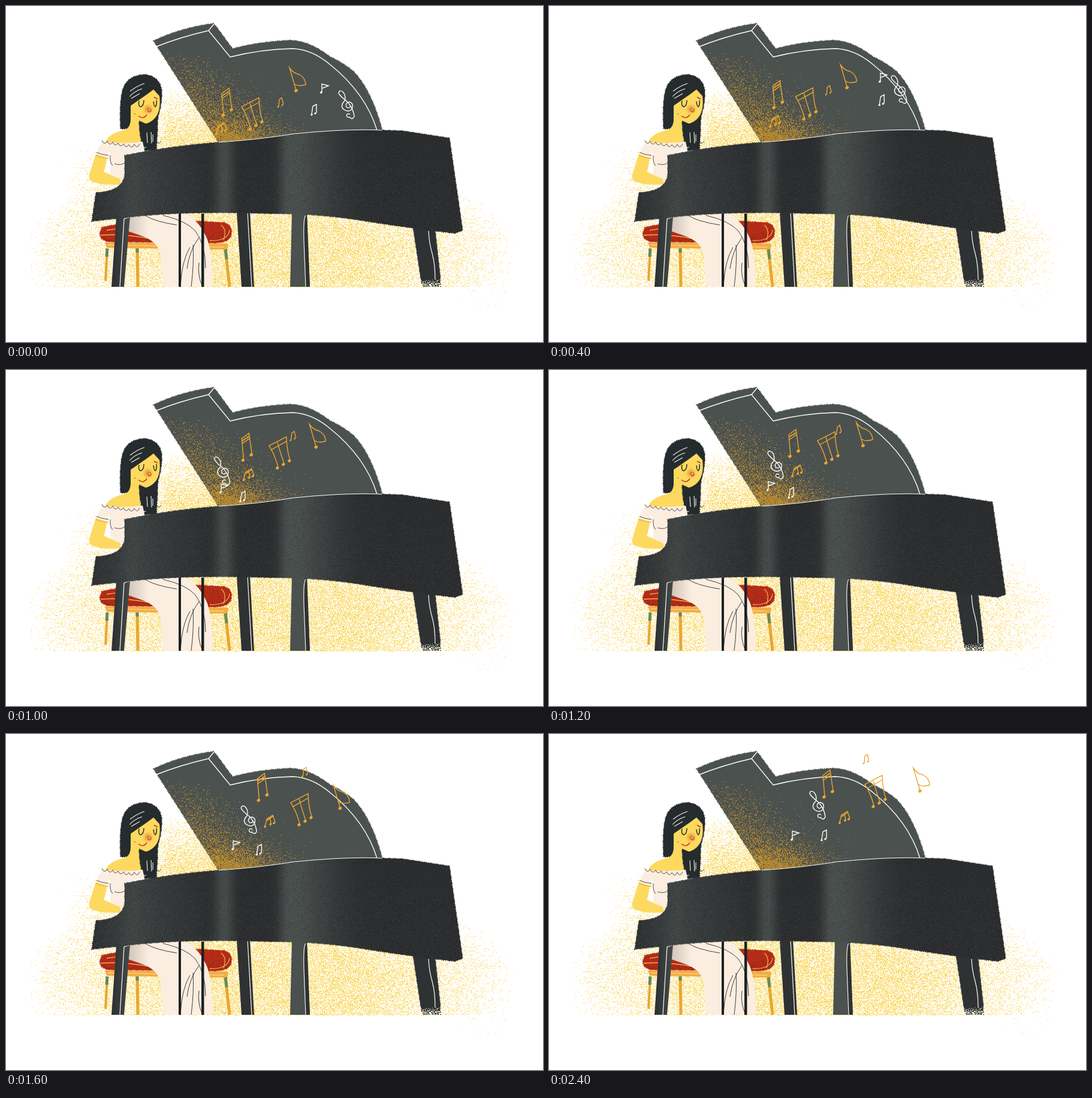
An HTML page with a canvas for the animation above (2600 ms loop, 896x560 px).

```html
<!DOCTYPE html>
<html lang="en">
<head>
<meta charset="utf-8">
<title>Pianist</title>
<style>
html, body { margin: 0; width: 100%; height: 100%; overflow: hidden; background: #fff; }
canvas { display: block; }
</style>
</head>
<body>
<canvas id="stage" width="896" height="560"></canvas>
<script>
const W = 896, H = 560, STEP = 200, LOOP = 2600;
const ctx = document.getElementById('stage').getContext('2d');
const still = document.createElement('canvas');
still.width = W;
still.height = H;
const g = still.getContext('2d');

let seed = 7;
function rnd() {
  seed = (seed + 0x6D2B79F5) | 0;
  let t = Math.imul(seed ^ (seed >>> 15), 1 | seed);
  t = (t + Math.imul(t ^ (t >>> 7), 61 | t)) ^ t;
  return ((t ^ (t >>> 14)) >>> 0) / 4294967296;
}
const clamp = v => Math.max(0, Math.min(1, v));
const mix = (a, b, p) => a + (b - a) * p;
const bell = (v, mid, r) => Math.exp(-(((v - mid) / r) ** 2));

function fill(d, color) {
  g.fillStyle = color;
  g.fill(new Path2D(d));
}
function line(d, color, w = 1) {
  g.strokeStyle = color;
  g.lineWidth = w;
  g.stroke(new Path2D(d));
}
// filled shape with a crumbly chalk edge
function chalk(d, color) {
  fill(d, color);
  g.setLineDash([1, 2, 2, 1, 1, 3]);
  line(d, color, 1.8);
  g.setLineDash([]);
}
function grain(x0, y0, x1, y1, color, density) {
  g.fillStyle = color;
  for (let y = y0; y < y1; y++)
    for (let x = x0; x < x1; x++)
      if (rnd() < density(x, y)) g.fillRect(x, y, 1, 1);
}
function inside(d, draw) {
  g.save();
  g.clip(new Path2D(d));
  draw();
  g.restore();
}
function fade(x0, x1, from, to) {
  const grad = g.createLinearGradient(x0, 0, x1, 0);
  grad.addColorStop(0, from);
  grad.addColorStop(1, to);
  return grad;
}

const INK = '#262b2d', DARK = '#2e3233', SLATE = '#4b514f', CREAM = '#fbeee0';
const SKIN = '#fdd95f', GOLD = '#eaa62f', WHITE = '#fbfbf8', RED = '#b42c18', GLOW = '#f9d658';

const LID = 'M246 58Q292 36 346 29L350 33L378 71Q424 59 473 57Q505 57 540 84Q562 94 580 109Q610 140 628 207L640 222L355 228Z';
const BODY = 'M198 249Q268 234 355 227Q420 223 480 213Q570 204 662 208L740 220L762 374L749 379Q650 367 590 357Q520 346 440 346Q300 341 205 352L143 359L150 311Q194 309 198 282Z';

function glow() {
  grain(40, 240, 860, 500, GLOW, (x, y) => {
    if (y > 468) return .01 * bell(x, 795, 45);
    const r = Math.hypot((x - 440) / 395, (y - 415) / 170);
    return .46 * clamp((1.04 - r) / .62);
  });
  grain(90, 225, 215, 345, GLOW, (x, y) => .15 * bell(x, 160, 38) * bell(y, 300, 38));
  grain(245, 125, 362, 240, GLOW, (x, y) =>
    .5 * clamp((y - 135) / 85) * clamp((x - 238) / 35));
}

function lid() {
  chalk(LID, SLATE);
  inside(LID, () => grain(246, 50, 530, 230, 'rgba(214,156,42,.8)', (x, y) => {
    const d = ((x - 246) * 168 - (y - 58) * 111) / 201;
    return .6 * bell(y, 226, 33) * bell(x, 375, 72)
      + .32 * bell(d, 10, 50) * clamp((y - 75) / 85);
  }));
  line('M250 68Q290 52 338 41L347 30M338 41L374 85Q426 72 478 71Q510 72 540 97Q600 145 619 207', WHITE, 1.4);
}

function stool() {
  line('M169 404L166 458', GOLD, 4);
  line('M219 404L220 468', GOLD, 5);
  line('M366 404L373 468', GOLD, 5);
  line('M169 404L168 418M219 404L219 411M366 404L368 422', '#6a8a55', 5);
  fill('M165 394L370 396Q373 402 366 406L168 403Z', '#f2ad43');
  line('M170 398L364 402', '#fbe0a0', 1);
  const cushion = 'M160 369Q190 360 250 362L312 358L364 361Q379 365 376 382Q372 394 350 395L170 393Q150 388 160 369Z';
  chalk(cushion, RED);
  inside(cushion, () => {
    grain(160, 364, 374, 393, '#8f2015', (x, y) => .2 * clamp((y - 362) / 30));
    line('M158 382Q196 379 242 388M168 374Q186 370 196 372M340 391Q371 392 373 373M359 365Q369 373 363 390', '#f0b04c', 1.3);
  });
}

function skirt() {
  const cloth = 'M198 349L300 345Q324 360 336 389Q346 421 345 468H262Q260 430 257 411Q252 392 226 383L197 373Z';
  fill(cloth, CREAM);
  inside(cloth, () => {
    g.fillStyle = fade(200, 238, 'rgba(90,85,80,.3)', 'rgba(90,85,80,0)');
    g.fillRect(195, 345, 45, 45);
  });
  line('M232 349Q247 359 285 365M262 349Q301 358 316 375Q333 398 333 437M312 398Q314 428 309 468M307 402Q293 425 291 468M322 386Q306 407 302 438M322 428Q319 448 328 468', INK, .9);
}

function head() {
  chalk('M191 204Q189 162 194 142Q200 116 231 114Q257 117 260 141Q261 165 252 188L215 200Q200 207 191 204Z', INK);
  fill('M208 160L240 172L228 225L258 234L164 233Q166 214 196 207Q208 204 208 188Z', SKIN);
  chalk('M222 186L258 158Q252 190 253 205L251 240L231 241Q222 222 222 186Z', INK);
  fill('M208 163Q226 155 246 139L256 150Q259 172 250 185Q243 194 233 196L222 191Q211 190 208 180Z', SKIN);
  fill('M205 168Q222 157 246 139L240 126L206 140Z', INK);

  const blush = g.createRadialGradient(237, 172, 1, 237, 172, 10);
  blush.addColorStop(0, 'rgba(190,105,35,.65)');
  blush.addColorStop(1, 'rgba(235,150,40,0)');
  g.fillStyle = blush;
  g.fillRect(226, 161, 22, 22);
  fill('M236 174a3.4 3.4 0 1 0 6.8 0a3.4 3.4 0 1 0 -6.8 0', '#dd6a2c');
  fill('M238 173a1.3 1.3 0 1 0 2.6 0a1.3 1.3 0 1 0 -2.6 0', '#f9d6a0');
  line('M222 158Q220 167 225 168Q230 166 230 157M246 159Q247 168 249 168Q252 165 251 157', INK, 1.5);
  line('M247 152L253 155M221 183Q229 190 235 181', '#bd3522', 1.5);
  fill('M214 179h2v2h-2z', '#c48a25');
  line('M207 142Q219 133 231 129M206 151Q214 142 227 138M209 154L223 146M235 211L236 228M242 210L243 229M245 214L245 226', '#f4f4f0', 1.1);
}

function bodice() {
  fill('M172 240L235 235L200 250L196 298L180 298Q171 274 172 240Z', CREAM);
  fill('M150 246L169 250Q166 266 164 276Q176 283 190 288L192 297Q164 300 145 293Q137 290 139 281Z', SKIN);
  fill('M163 276Q170 262 175 243Q172 262 174 277Q169 281 163 276Z', '#fff');
  fill('M161 225Q190 231 228 226L231 240L170 243L171 254L150 247Z', CREAM);
  const waves = 'M160 224' + 'q4 9 9 1.4'.repeat(5) + 'q5 9 9 -.6'.repeat(2);
  line(waves + 'M251 226q3 6 8 -1M151 244Q160 248 171 249M174 249Q173 261 178 266M181 263Q191 266 197 262', '#54524d', 1);
  line('M150 249Q159 253 170 254', '#eca63a', 1.3);
}

function legs() {
  fill('M184 352L207 350L197 468H176Z', fade(176, 207, '#2b2f30', '#454a49'));
  line('M205 352L197 355L190 468', WHITE, 1.2);
  fill('M385 343L407 343L414 468H393Z', DARK);
  line('M403 343Q406 395 410 468', WHITE, 1.2);
  fill('M477 345L502 345L507 468H474Z', SLATE);
  fill('M502 345L507 468H499L496 390Q495 354 502 345Z', DARK);
  line('M500 349Q496 354 497 390L500 468', WHITE, 1.2);
  chalk('M679 368L716 373L725 454L692 454Z', DARK);
  inside('M679 368L716 373L726 468H694Z', () =>
    grain(688, 452, 730, 469, DARK, (x, y) => clamp((472 - y) / 17)));
  line('M705 375Q706 395 711 412Q716 430 716 456', WHITE, 1.2);
  fill('M288 346h4v122h-4zM326 346h4.5v122h-4.5z', '#1d2123');
}

// how strongly the lacquer shines at x
const shine = x => clamp(.5 * clamp((345 - x) / 110) * clamp((x - 130) / 70)
  + .2 * bell(x, 212, 16) + .9 * bell(x, 364, 15) + bell(x, 472, x < 472 ? 16 : 75));

function body() {
  const x0 = 143, x1 = 762, n = 80;
  const lacquer = g.createLinearGradient(x0, 0, x1, 0);
  for (let i = 0; i <= n; i++) {
    const s = shine(mix(x0, x1, i / n));
    lacquer.addColorStop(i / n, `rgb(${mix(43, 75, s)},${mix(45, 81, s)},${mix(47, 79, s)})`);
  }
  chalk(BODY, lacquer);
  inside(BODY, () => {
    grain(x0, 204, 764, 382, 'rgba(20,22,25,.28)', () => .15);
    grain(x0, 204, 764, 382, 'rgba(105,112,108,.25)', (x, y) => .1 * clamp((y - 200) / 130));
  });
  line('M355 227Q420 223 480 213Q570 204 628 207', WHITE, 1.2);
}

[glow, lid, stool, skirt, head, bodice, legs, body].forEach(part => part());

// outline, note heads and head size, at the first position
const SHAPES = {
  pair: ['M363 181L360 146L372 137L377 172M361 150L373 141M361 154L374 145M362 148L371 144', [[362, 182], [376, 173]], 2.9],
  trio: ['M408 203Q402 181 393 168L422 153Q423 178 428 191M396 175L423 160M407 162Q413 183 418 197', [[407, 205], [417, 199], [427, 193]], 2.8],
  small: ['M351 212L354 200L364 194L368 206M354 202L364 196L354 203M359 198L361 208', [[351, 213], [360, 209], [366, 207]], 2.1],
  tiny: ['M455 167L456 156L460 153L463 164', [[454, 168], [461, 165]], 1.6],
  flag: ['M484 140L473 103Q479 112 489 114Q500 120 500 131Q489 135 481 130', [[484, 141]], 3],
  duo: ['M510 180L512 167L518 164L518 178', [[510, 181], [516, 179]], 1.9],
  pennant: ['M527 143L527 130L538 133L528 137', [[526, 144]], 2],
  clef: ['M574 181a3 3 0 1 0 -1 4Q578 191 581 184Q580 172 570 160Q556 149 555 145Q556 139 562 143Q568 150 565 158Q557 166 563 172Q571 178 577 172Q581 162 573 160Q565 162 568 168Q572 172 575 167', [], 0]
};
for (const s of Object.values(SHAPES)) s[0] = new Path2D(s[0]);

// a straight flight between two steps, from and to given as offsets
const leg = (n0, n1, from, to, power = 1) => ({ n0, n1, from, to, power });
const rise = (mid, jump, end) => [leg(0, 6, [0, 0], mid), leg(7, 12, jump, end)];
const wrap = (out, first, back, end, power) => [leg(0, 3, [0, 0], out), leg(first, 12, back, end, power)];

const NOTES = [
  ['pair', GOLD, rise([40, -38], [50, -70], [97, -77])],
  ['trio', GOLD, rise([55, -50], [69, -46], [134, -84])],
  ['small', GOLD, rise([55, -36], [68, -57], [134, -65])],
  ['tiny', GOLD, rise([25, -61], [33, -92], [71, -119])],
  ['flag', GOLD, rise([40, -15], [58, -10], [135, -46])],
  ['duo', WHITE, wrap([62, -24], 5, [-119, 38], [-55, -4])],
  ['pennant', WHITE, wrap([39, -27], 5, [-168, 60], [-121, 32])],
  ['clef', WHITE, wrap([24, -38], 4, [-238, 21], [-120, -46], .65)]
];

function drawNote([name, color, legs], n) {
  const now = legs.find(l => n >= l.n0 && n <= l.n1);
  if (!now) return;
  const p = ((n - now.n0) / (now.n1 - now.n0)) ** now.power;
  const [path, heads, r] = SHAPES[name];
  ctx.save();
  ctx.translate(mix(now.from[0], now.to[0], p), mix(now.from[1], now.to[1], p));
  ctx.strokeStyle = ctx.fillStyle = color;
  ctx.lineWidth = 1.4;
  ctx.stroke(path);
  for (const [x, y] of heads) {
    ctx.beginPath();
    ctx.ellipse(x, y, r, r * .85, -.6, 0, 7);
    ctx.fill();
  }
  ctx.restore();
}

const start = performance.now();
function frame() {
  const n = Math.floor((performance.now() - start) % LOOP / STEP);
  ctx.clearRect(0, 0, W, H);
  ctx.drawImage(still, 0, 0);
  for (const note of NOTES) drawNote(note, n);
  requestAnimationFrame(frame);
}
frame();
</script>
</body>
</html>
```
